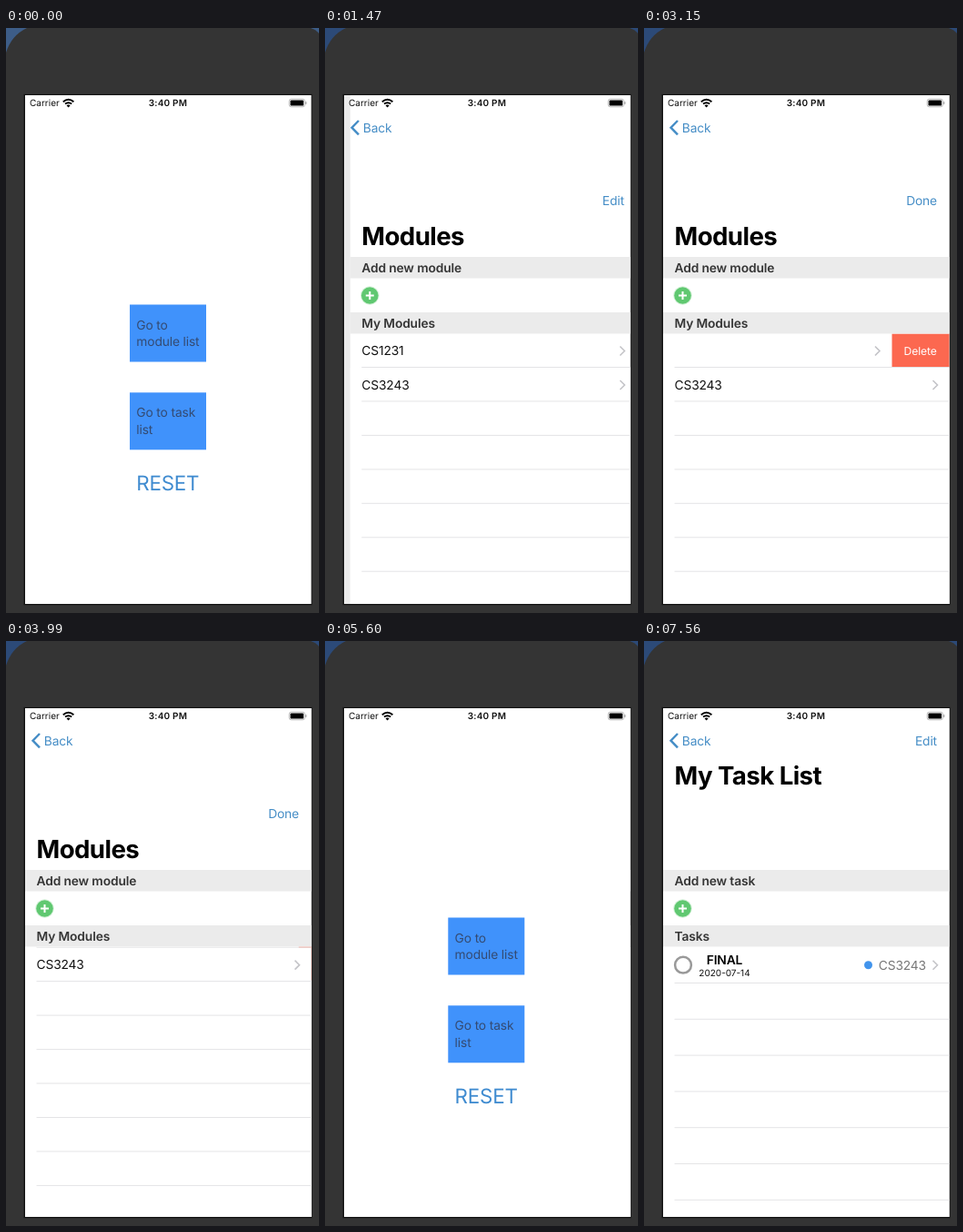
An HTML page that plays this animation: 344 by 644 pixels, repeating every 8000 ms.

```html
<!DOCTYPE html>
<html lang="en">
<head>
<meta charset="utf-8">
<title>Module list</title>
<style>
  html, body { margin: 0; width: 100%; height: 100%; overflow: hidden; background: #343434; }
  svg { display: block; width: 344px; height: 644px; }
  text { font: 400 13.8px Inter, Roboto, sans-serif; letter-spacing: -.01em; fill: #111; text-rendering: geometricPrecision; }
  .title { font-size: 27.6px; font-weight: 700; letter-spacing: -.02em; fill: #000; }
  .section { font-weight: 600; fill: #353535; }
  .strong { font-weight: 600; fill: #000; }
  .link { fill: #458dc6; }
  .reset { font-size: 22.4px; fill: #3f8bd0; }
  .label { fill: #344b73; }
  .grey { fill: #777; }
  .small { font-size: 10px; letter-spacing: 0; }
  .clock { font-weight: 600; letter-spacing: .02em; }
  .end { text-anchor: end; }
  .mid { text-anchor: middle; }
  .white { fill: #fff; font-size: 12.2px; }
</style>
</head>
<body>
<script>
const LOOP = 8000, WIDTH = 316, ROW = 37.45, LIST_TOP = 336.5;

const text = (x, y, str, cls = '') => `<text x="${x}" y="${y}" class="${cls}">${str}</text>`;
const rect = (x, y, w, h, fill, more = '') =>
  `<rect x="${x}" y="${y}" width="${w}" height="${h}" fill="${fill}" ${more}/>`;
const section = (y, str) => rect(21, y, WIDTH, 23.5, '#ebebeb') + text(33.5, y + 17, str, 'section');
const chevron = y => `<path d="M317.5 ${y - 5} l5 5 l-5 5" fill="none" stroke="#c4c4c8" stroke-width="1.6"/>`;
const lines = (first, gap, count) => Array.from({ length: count }, (_, i) =>
  rect(33.5, (first + gap * i).toFixed(1), 304, 1, '#e4e4e6')).join('');
const plus = `<circle cx="42.5" cy="294.5" r="10.3" fill="#d6f1da"/>
  <circle cx="42.5" cy="294.5" r="9.3" fill="#60c871"/>
  <path d="M38 294.5h9M42.5 290v9" stroke="#fff" stroke-width="2"/>`;
const button = (id, y, a, b) => `<g id="${id}">${rect(136, y, 84, 63, '#4092fb')}
  ${text(143.3, y + 27, a, 'label')}${text(143.3, y + 45.5, b, 'label')}</g>`;
const moduleRow = (y, code) => text(33.5, y + 23.7, code) + chevron(y + 19);

document.body.innerHTML = `<svg viewBox="0 0 344 644">
  <defs>
    <clipPath id="screenClip">${rect(21, 74, 314.5, 560)}</clipPath>
    <clipPath id="listClip">${rect(0, LIST_TOP, 700, 300)}</clipPath>
    <linearGradient id="fade"><stop stop-color="#fff" stop-opacity="0"/><stop offset="1" stop-color="#fff"/></linearGradient>
  </defs>
  <rect id="desk" width="344" height="644"/>
  <path d="M0 27Q6 8 23 0H335Q341 2 344 6V644H0Z" fill="#343434"/>
  ${rect(19.5, 72.8, 317, 562.5, '#141414')}
  <g clip-path="url(#screenClip)">
    ${rect(21, 74, 315, 561, '#fff')}
    <g id="home">
      ${button('moduleButton', 304.5, 'Go to', 'module list')}
      ${button('taskButton', 401.3, 'Go to task', 'list')}
      ${text(143.3, 509, 'RESET', 'reset')}
    </g>
    <rect id="dim" x="21" y="74" width="315" height="561"/>

    <g id="modules">
      ${rect(21, 74, WIDTH, 561, '#fff')}
      ${text(33.5, 238.5, 'Modules', 'title')}
      <text id="edit" x="322" y="195" class="link end"></text>
      ${section(252, 'Add new module')}${plus}${section(313, 'My Modules')}
      <g clip-path="url(#listClip)">
        <g id="firstRow">
          <g id="swiped">${moduleRow(LIST_TOP, 'CS1231')}</g>
          <rect id="remove" y="${LIST_TOP}" height="37" fill="#fc6850"/>
          <text id="removeLabel" y="359.8" class="white">Delete</text>
        </g>
        <g id="rows">
          ${rect(21, 374, WIDTH, 300, '#fff')}
          ${moduleRow(LIST_TOP + ROW, 'CS3243')}
          ${lines(373, ROW, 8)}
        </g>
      </g>
    </g>

    <g id="tasks">
      ${rect(21, 74, WIDTH, 561, '#fff')}
      ${section(252, 'Add new task')}${plus}${section(313, 'Tasks')}
      <circle cx="43" cy="356.7" r="8.9" fill="none" stroke="#999" stroke-width="2.5"/>
      ${text(88.5, 355.6, 'FINAL', 'strong mid')}${text(88.5, 369, '2020-07-14', 'small mid')}
      <circle cx="246.5" cy="356.8" r="4.5" fill="#4294ec"/>
      ${text(310, 362, 'CS3243', 'grey end')}${chevron(356.8)}
      ${lines(376, 39.8, 7)}
    </g>
    <g id="taskTitle">${text(33.5, 158, 'My Task List', 'title')}</g>
    ${rect(308, 128, 24, 42, 'url(#fade)', 'class="titleFade"')}
    ${rect(331.5, 128, 6, 42, '#fff', 'class="titleFade"')}
    <g id="taskEdit">${text(322, 114.5, 'Edit', 'link end')}</g>

    <g id="back">
      <path d="M37 102l-7.5 7.7l7.5 7.7" fill="none" stroke="#458dc6" stroke-width="2.4"/>
      ${text(41.8, 114.5, 'Back', 'link')}
    </g>
    ${text(26, 86.3, 'Carrier', 'small')}${text(178, 86.3, '3:40 PM', 'small clock mid')}
    <g fill="none" stroke="#000" stroke-width="1.9">
      <path d="M62.8 81.2Q68.6 76.4 74.4 81.2M65 83.6Q68.6 80.7 72.2 83.6"/>
      <path d="M66.5 85.2Q68.6 83.7 70.7 85.2L68.6 87.4Z" fill="#000" stroke="none"/>
    </g>
    ${rect(311.2, 78.2, 17.2, 8.6, 'none', 'rx="2.3" stroke="#aaa" stroke-width=".8"')}
    ${rect(312.5, 79.4, 14.6, 6.2, '#000', 'rx="1.2"')}
    ${rect(329.2, 81, 1.2, 3, '#aaa', 'rx=".6"')}
  </g>
</svg>`;

const el = Object.fromEntries([...document.querySelectorAll('[id]')].map(n => [n.id, n]));
const titleFades = document.querySelectorAll('.titleFade');
const clamp = v => Math.max(0, Math.min(1, v));
const span = (t, from, to) => clamp((t - from) / (to - from));
const easeInOut = u => u < .5 ? 4 * u ** 3 : 1 - 4 * (1 - u) ** 3;

// Critically damped spring used for page pushes and pops
function spring(t, start) {
  const x = Math.max(0, t - start) * .01826;
  return t - start > 560 ? 1 : 1 - (1 + x) * Math.exp(-x);
}
const press = (t, from, to) => t < from || t > to ? 1 : .5 + .5 * span(t, from + 70, to);
const move = (node, x, y = 0) => node.setAttribute('transform', `translate(${x.toFixed(2)} ${y.toFixed(2)})`);
const fade = (node, value) => node.setAttribute('opacity', value.toFixed(3));

function render(t) {
  const popping = t >= 5218;
  const modules = popping ? 1 - spring(t, 5218) : spring(t, 1156);
  const tasks = spring(t, 6375);
  const page = Math.max(modules, tasks);

  el.desk.setAttribute('fill', t < 840 ? '#3d5d88' : '#2c4a78');
  move(el.home, -.3 * WIDTH * page);
  fade(el.dim, .08 * span(page, .35, 1));
  fade(el.moduleButton, press(t, 1120, 1200));
  fade(el.taskButton, press(t, 6160, 6370));

  move(el.modules, WIDTH * (1 - modules));
  el.edit.textContent = t >= 2310 && t < 4340 ? 'Done' : 'Edit';

  const swipe = 63.5 * easeInOut(span(t, 2240, 2900));
  const gone = easeInOut(span(t, 3710, 4060));
  const red = swipe * (1 - .8 * gone);
  move(el.swiped, -swipe - WIDTH * gone);
  el.remove.setAttribute('x', 336 - red);
  el.remove.setAttribute('width', red);
  el.removeLabel.setAttribute('x', 349 - red);
  el.firstRow.style.display = gone < 1 ? '' : 'none';
  move(el.rows, 0, -ROW * gone);

  move(el.tasks, WIDTH * (1 - tasks));
  move(el.taskTitle, WIDTH * 1.115 * (1 - tasks));
  fade(el.taskTitle, clamp(1.35 * tasks));
  titleFades.forEach(node => fade(node, tasks > 0 && tasks < .85 ? 1 : 0));
  fade(el.taskEdit, clamp((tasks - .15) / .8));

  const pressed = t >= 5040 && t < 6375;
  fade(el.back, pressed ? .2 * modules ** 2 : clamp((page - .4) / .5));
}

const start = performance.now();
function tick() {
  render((performance.now() - start) % LOOP);
  requestAnimationFrame(tick);
}
tick();
</script>
</body>
</html>
```
